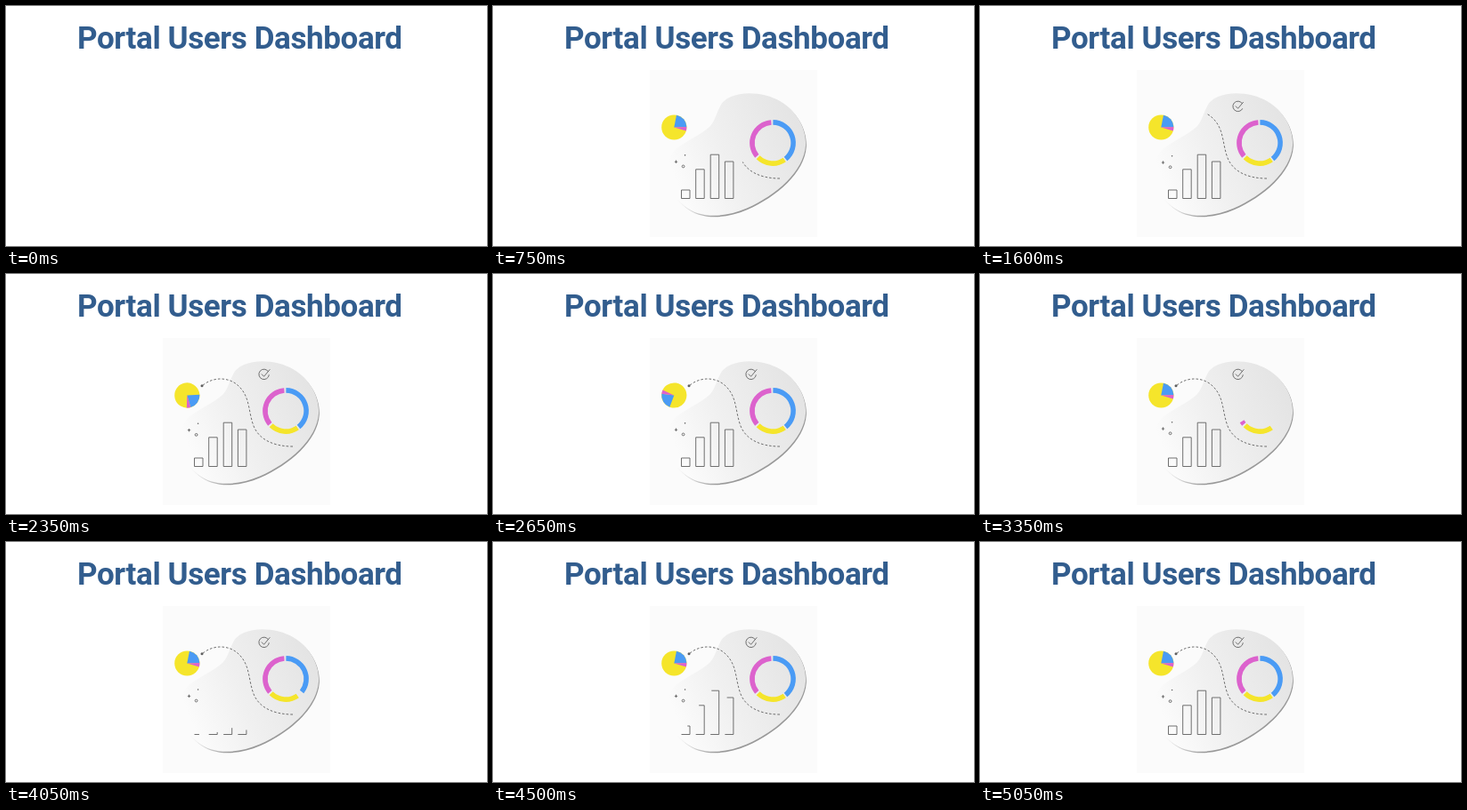
Animation, 540 px wide and 270 px high, one loop 5100 ms. Source, as an HTML page:

```html
<!DOCTYPE html>
<html lang="en">
<head>
<meta charset="utf-8">
<title>Portal Users Dashboard</title>
<style>
  html, body { margin: 0; width: 100%; height: 100%; overflow: hidden; background: #fff; }
  svg { display: block; width: 540px; height: 270px; }
  .title { font: 700 35px Roboto, sans-serif; letter-spacing: -.4px; fill: #325d8e; }
  .line { fill: none; stroke: #606060; stroke-width: .9; }
  .ring { fill: none; stroke-width: 5.6; }
</style>
</head>
<body>
<svg viewBox="0 0 540 270">
  <defs>
    <linearGradient id="face" gradientUnits="userSpaceOnUse" x1="205" y1="195" x2="345" y2="135">
      <stop offset="0" stop-color="#fbfbfb"/>
      <stop offset=".4" stop-color="#f0f0f0"/>
      <stop offset="1" stop-color="#e4e4e4"/>
    </linearGradient>
    <linearGradient id="shade" gradientUnits="userSpaceOnUse" x1="206" y1="0" x2="250" y2="0">
      <stop offset="0" stop-color="#fbfbfb"/>
      <stop offset="1" stop-color="#999"/>
    </linearGradient>
    <path id="blob" d="M255 113C262 96 299 93 323 107.5C341 118 352 138 351 157C349 186 318 213 285 227.5C258 239 232 239 215 225C198 212 190 190 200 168C205 157 228 148 238 140C249 133 249 124 255 113Z"/>
    <path id="trail" d="M322 194C300 194 284 186 278 171C272 155 274 140 263 128C252 115 232 115 220 126"/>
    <mask id="trailMask" maskUnits="userSpaceOnUse" x="176" y="72" width="188" height="188">
      <use href="#trail" id="trailReveal" fill="none" stroke="#fff" stroke-width="6"/>
    </mask>
  </defs>

  <text class="title" x="80" y="48.4">Portal Users Dashboard</text>

  <g id="scene">
    <rect x="176" y="72" width="188" height="188" fill="#fbfbfb"/>
    <use href="#blob" x=".8" y="1.4" fill="url(#shade)"/>
    <use href="#blob" fill="url(#face)"/>

    <g id="pie">
      <circle cx="203.3" cy="136.5" r="14.1" fill="#f5e52b"/>
    </g>
    <g id="donut"></g>
    <g id="bars" class="line"></g>

    <g mask="url(#trailMask)">
      <use href="#trail" class="line" stroke-dasharray="2.6 2"/>
    </g>
    <circle id="trailEnd" cx="220" cy="125.8" r="1.5" fill="#606060"/>

    <g id="check" class="line" transform="translate(.3 .3)">
      <path pathLength="1" d="M294.2 109.6A5.7 5.7 0 1 0 295 113"/>
      <path pathLength="1" d="M286.6 112.2L289.3 115L296 107"/>
    </g>

    <g id="sparkles" class="line">
      <path d="M203.8 174.7h3.4M205.5 173v3.4"/>
      <circle cx="213.6" cy="179.9" r="1.4"/>
      <circle cx="215.6" cy="167.3" r=".8" fill="#606060" stroke="none"/>
    </g>
  </g>
</svg>

<script>
const LOOP = 5100, STEP = 50;
const BLUE = '#4a9bf5', PINK = '#dc62cd', YELLOW = '#f5e52b';
const $ = id => document.getElementById(id);

function add(parent, attributes) {
  const path = document.createElementNS('http://www.w3.org/2000/svg', 'path');
  for (const name in attributes) path.setAttribute(name, attributes[name]);
  return parent.appendChild(path);
}

function polar(cx, cy, r, degrees) {
  const a = degrees * Math.PI / 180;
  return `${cx + r * Math.cos(a)} ${cy + r * Math.sin(a)}`;
}

function arc(cx, cy, r, from, to) {
  const large = to - from > 180 ? 1 : 0;
  return `M${polar(cx, cy, r, from)}A${r} ${r} 0 ${large} 1 ${polar(cx, cy, r, to)}`;
}

for (const [from, to, fill] of [[-79, -2, BLUE], [-2, 16, PINK]])
  add($('pie'), { d: arc(203.3, 136.5, 14.1, from, to) + 'L203.3 136.5Z', fill });

const segments = [[55, 135, YELLOW], [140, 266, PINK], [271, 411, BLUE]].map(
  ([from, to, stroke]) => ({ from, to, path: add($('donut'), { class: 'ring', stroke }) }));

const bars = [[211.5, 207], [227.7, 183.8], [244.2, 167.2], [260.4, 175]].map(
  ([x, top]) => add($('bars'), { d: `M${x} 216.5h9.5V${top}h-9.5Z`, pathLength: 1 }));

const trailLength = $('trail').getTotalLength();
const progress = (t, start, end) => Math.min(1, Math.max(0, (t - start) / (end - start)));

// Shows the first part p of a path of the given length.
function reveal(path, p, length = 1) {
  path.style.visibility = p > 0 ? 'visible' : 'hidden';
  path.style.strokeDasharray = p < 1 ? `${p * length} ${length * 2}` : 'none';
}

function draw(t) {
  $('scene').style.display = t < 100 ? 'none' : '';

  const trail = progress(t, 100, 2100);
  reveal($('trailReveal'), trail, trailLength);
  $('trailEnd').style.visibility = trail > .97 ? 'visible' : 'hidden';

  const check = progress(t, 900, 1650);
  for (const path of $('check').children) reveal(path, check);

  $('pie').setAttribute('transform', `rotate(${360 * progress(t, 2150, 3100)} 203.3 136.5)`);

  const sweep = t < 3085 ? 411 : 55 + 356 * progress(t, 3085, 4085);
  for (const { from, to, path } of segments) {
    const end = Math.min(to, sweep);
    path.setAttribute('d', end > from ? arc(314, 154, 23.1, from, end) : '');
  }

  const outline = t < 3900 ? 1 : progress(t, 3900, 4950);
  for (const bar of bars) reveal(bar, outline);

  const drift = 1.4 * Math.cos(2 * Math.PI * (t - 1700) / LOOP);
  $('sparkles').setAttribute('transform', `translate(0 ${drift})`);
}

const start = performance.now();
function tick() {
  const t = (performance.now() - start) % LOOP;
  draw(Math.floor(t / STEP) * STEP);
  requestAnimationFrame(tick);
}
tick();
</script>
</body>
</html>
```
